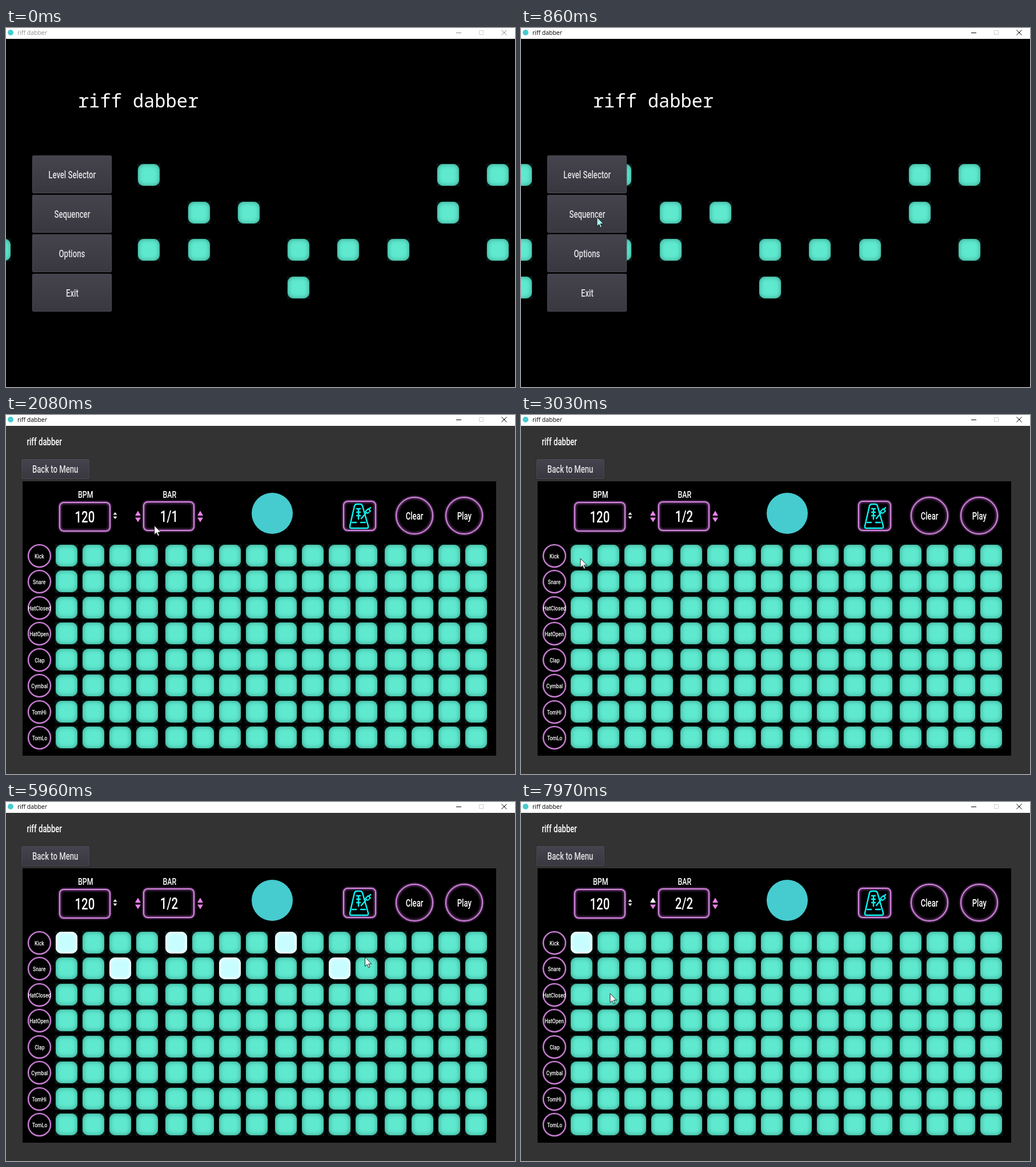
An HTML page for the animation above (8000 ms loop, 891 px wide and 628 px high).

```html
<!DOCTYPE html>
<html lang="en">
<head>
<meta charset="utf-8">
<title>riff dabber</title>
<style>
html, body { margin: 0; width: 100%; height: 100%; overflow: hidden; background: #000; }
#stage { position: absolute; left: 0; top: 0; width: 891px; height: 628px; overflow: hidden; font-family: Roboto, sans-serif; color: #fff; }
.scene { position: absolute; inset: 0; }
#menu { background: #000; }
#sequencer { background: #333; }
.box { position: absolute; box-sizing: border-box; display: flex; align-items: center; justify-content: center; white-space: pre; }
.narrow { transform: scaleX(.73); font-weight: 500; }
.button { background: linear-gradient(#45434d, #39373f); border: 1px solid #4b4954; border-radius: 2px; box-shadow: 0 0 2px #222; color: #e2e2e4; font-size: 18px; }
.logo { border-radius: 50%; background: #46cbcf; }
.neon { border: 2px solid #d287dc; border-radius: 8px; background: #000; box-shadow: inset 0 0 4px 1px #8a4a94, 0 0 3px 1px #7d4388; }
.round { border-radius: 50%; }
.drum { padding-top: 1px; box-shadow: inset 0 0 2px #8a4a94, 0 0 2px #7d4388; font-size: 11.75px; }
.cell { background: #0a1614; }
.cell::before { content: ""; position: absolute; inset: 1px; border-radius: 10px; background: #5fe9cf; box-shadow: inset 0 0 9px #349a86; }
.cell.on::before { background: #c8fdff; box-shadow: inset 0 0 5px 2px #fff; }
#titlebar { background: #fff; }
#caption { font: 10.5px "Open Sans", sans-serif; }
#logotype { font: 32px "Noto Sans Mono", monospace; }
#caret { background: #e4ffff; }
svg { position: absolute; left: 0; top: 0; overflow: visible; }
</style>
</head>
<body>
<div id="stage">
  <div id="menu" class="scene"></div>
  <div id="sequencer" class="scene">
    <div class="box" style="left:29px;top:116px;width:829px;height:480px;background:#000"></div>
  </div>
  <div id="titlebar" class="box" style="left:0;top:0;width:891px;height:19px"></div>
  <svg width="891" height="628" fill="none">
    <path d="M828.5 4.5h7v7h-7z" stroke="#d0d0d0"/>
    <path id="controls" d="M788 8.5h9M867.5 3.5l9 9M876.5 3.5l-9 9"/>
    <path id="pointer" d="M0 0V16L3.7 12.5 6.2 18.2 8.6 17.1 6.1 11.6H11.3Z" stroke="#111" stroke-width=".9"/>
  </svg>
</div>
<script>
const $ = id => document.getElementById(id);
const menu = $("menu"), sequencer = $("sequencer"), pointer = $("pointer");

function box(parent, x, y, w, h, className = "", text = "", size) {
  const el = document.createElement("div");
  el.className = "box " + className;
  Object.assign(el.style, { left: x + "px", top: y + "px", width: w + "px", height: h + "px" });
  if (size) el.style.fontSize = size + "px";
  if (text) {
    const label = document.createElement("span");
    label.className = "narrow";
    label.textContent = text;
    el.append(label);
  }
  parent.append(el);
  return el;
}

function plainText(parent, id, x, y, w, h, text) {
  const el = box(parent, x, y, w, h);
  el.id = id;
  el.textContent = text;
  return el;
}

const caption = plainText($("titlebar"), "caption", 16, 0, 60, 16, "riff dabber");
box($("titlebar"), 3, 3, 10, 10, "logo");

// Menu: scrolling notes behind the buttons
const notes = box(menu, 0, 0, 891, 628);
[".x.x.....xx", "....xx...x.", "xx.xx.xxx.x", ".x....x...."].forEach((pattern, row) =>
  [...pattern].forEach((mark, col) => {
    if (mark === "x") box(notes, 87.25 * col - 31.3, 237.3 + row * 65.4, 40, 40, "cell");
  }));
["Level Selector", "Sequencer", "Options", "Exit"].forEach((name, i) =>
  box(menu, 46, 223 + i * 69, 139, 66, "button", name));
plainText(menu, "logotype", 126, 107, 211, 39, "riff dabber");
const caret = box(menu, 346, 110, 3, 32);
caret.id = "caret";

// Sequencer
box(sequencer, 33, 34, 69, 24, "", "riff dabber", 18);
box(sequencer, 27, 77, 119, 35, "button", "Back to Menu");
box(sequencer, 109, 128, 60, 22, "", "BPM", 17);
box(sequencer, 256, 128, 60, 22, "", "BAR", 17);
box(sequencer, 93, 152, 90, 52, "neon", "120", 28);
const bar = box(sequencer, 240, 151, 90, 52, "neon", "1/1", 28).firstChild;
box(sequencer, 430, 136, 72, 72, "logo");
box(sequencer, 590, 150, 58, 53, "neon");
box(sequencer, 682, 143, 66, 66, "neon round", "Clear", 18);
box(sequencer, 769, 143, 66, 66, "neon round", "Play", 18);

sequencer.insertAdjacentHTML("beforeend", `<svg width="891" height="628" fill="none">
  <path d="M187.5 174.5l3.5-4.5 3.5 4.5zM187.5 177.5l3.5 4.5 3.5-4.5z" fill="#eee"/>
  <path d="M226 179.5h10l-5 8zM335 179.5h10l-5 8z" fill="#ee82ee"/>
  <path id="barUp" d="M226 176h10l-5-8.5z"/>
  <path id="totalUp" d="M335 176h10l-5-8.5z"/>
  <g stroke="#0ff0f0" stroke-width="2.5" stroke-linecap="round" stroke-linejoin="round">
    <path d="M614 156H620Q623 156 624 159L634 194Q635 198 631 198H605Q601 198 602 194L610 159Q611 156 614 156Z"/>
    <path d="M614 164h6M614 170h6M614 176h6M606 188h7M621 188h8M617 164v18"/>
    <path d="M622 181L638 162"/>
    <path d="M634 164l4 4-5 4-4-3z" fill="#000" stroke-width="2"/>
  </g></svg>`);

const cellLeft = col => 87 + (col >> 2) * 192 + (col % 4) * 47;
const cellTop = row => Math.round(227 + row * 45.43);
const cells = ["Kick", "Snare", "HatClosed", "HatOpen", "Clap", "Cymbal", "TomHi", "TomLo"].map((name, row) => {
  const y = cellTop(row);
  box(sequencer, 38, y - 1.5, 41, 41, "neon round drum", name);
  return Array.from({ length: 16 }, (_, col) => box(sequencer, cellLeft(col) - 1, y - 1, 40, 40, "cell"));
});

const LOOP = 8000, SCENE_START = 940, ADD_BAR = 2560, SECOND_BAR = 7000, TRAVEL = 240;
const onCell = (row, col) => [cellLeft(col) + 17, cellTop(row) + 24 - row * 6];

// Kick and snare alternate on every other step
const beats = Array.from({ length: 8 }, (_, i) =>
  ({ row: i % 2, col: 2 * i, time: i ? 4313 + 307 * i : 3220 }));

function isOn(row, col, t) {
  if (t >= SECOND_BAR) return row + col === 0 && t >= 7560;
  const misplaced = row === 0 && col === 2 && t >= 3880 && t < 4360;
  return misplaced || beats.some(b => b.row === row && b.col === col && t >= b.time);
}

// Each move: departure time and destination
const moves = [
  [0, [400, 597]],
  [240, [133, 331]],
  [1550, [99, 242]],
  [1980, [341, 169]],
  [2790, onCell(0, 0)],
  [3380, onCell(0, 2)],
  ...beats.slice(1).map(b => [b.time - TRAVEL - 20, onCell(b.row, b.col)]),
  [6680, [231, 169]],
  [7140, onCell(0, 0)],
  [7700, [156, 335]]
];

function pointerAt(t) {
  const i = Math.max(1, moves.findLastIndex(([depart]) => depart <= t));
  const [depart, to] = moves[i], from = moves[i - 1][1];
  const left = 1 - Math.min(1, Math.max(0, (t - depart) / TRAVEL));
  return to.map((end, axis) => end + (from[axis] - end) * left * left);
}

const show = (el, visible) => el.style.visibility = visible ? "visible" : "hidden";
const tint = (id, white) => $(id).setAttribute("fill", white ? "#fff" : "#ee82ee");

function draw(t) {
  const inMenu = t < SCENE_START, focused = t >= 860;
  show(menu, inMenu);
  show(sequencer, !inMenu);
  caption.style.color = focused ? "#000" : "#8c8c8c";
  $("controls").setAttribute("stroke", focused ? "#000" : "#888");

  notes.style.transform = `translateX(${-t * 0.0882}px)`;
  show(caret, inMenu && t >= 300 && t < 800);

  bar.textContent = t < ADD_BAR ? "1/1" : t < SECOND_BAR ? "1/2" : "2/2";
  tint("totalUp", t >= ADD_BAR - 40 && t < 2790);
  tint("barUp", t >= SECOND_BAR - 40);
  cells.forEach((line, row) => line.forEach((cell, col) =>
    cell.classList.toggle("on", isOn(row, col, t))));

  show(pointer, t >= 200);
  pointer.setAttribute("transform", `translate(${pointerAt(t)})`);
  pointer.setAttribute("fill", inMenu ? "#a8fff0" : "#fff");
}

const start = performance.now();
function tick() {
  draw((performance.now() - start) % LOOP);
  requestAnimationFrame(tick);
}
tick();
</script>
</body>
</html>
```
